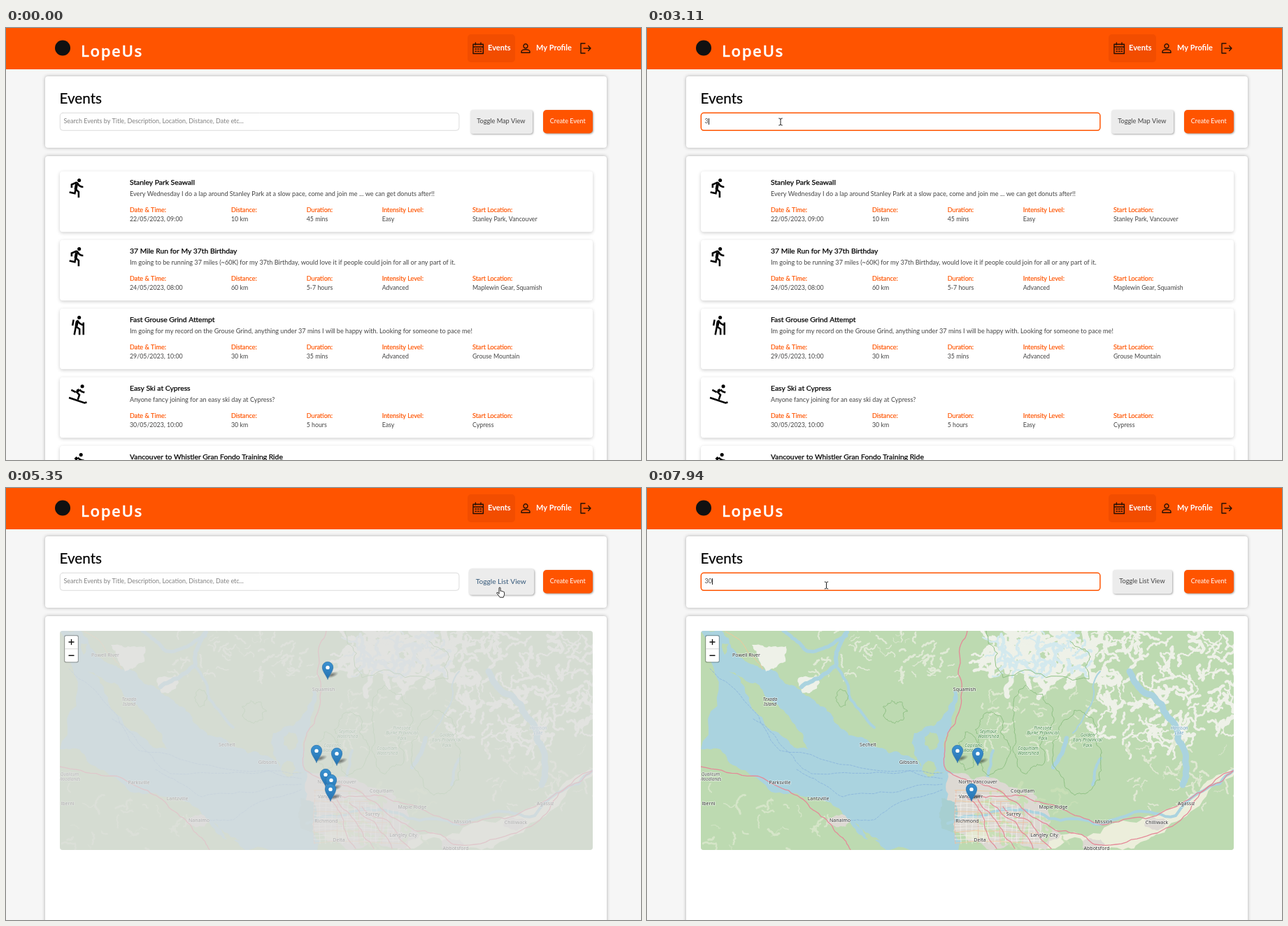
Write an HTML page with a canvas that moves like this. It is 908x617 px and loops after 8 s.

```html
<!DOCTYPE html>
<html lang="en">
<head>
<meta charset="utf-8">
<title>Events</title>
<style>
html, body { margin: 0; width: 100%; height: 100%; overflow: hidden; background: #f6f6f6; }
canvas { display: block; width: 908px; height: 617px; }
</style>
</head>
<body>
<canvas id="stage"></canvas>
<script>
const W = 908, H = 617, LOOP = 8000, ORANGE = '#ff5400';
const dpr = window.devicePixelRatio || 1;
const LATO = 'Lato, sans-serif', NOTO = '"Noto Sans", sans-serif';
let g = setup(document.getElementById('stage'));

function setup(canvas) {
  canvas.width = W * dpr;
  canvas.height = H * dpr;
  const c = canvas.getContext('2d');
  c.scale(dpr, dpr);
  c.lineJoin = c.lineCap = 'round';
  return c;
}

// Drawing helpers
function text(s, x, y, size, color, o = {}) {
  g.font = `${o.style || ''} ${o.weight || 400} ${size}px ${o.font || LATO}`;
  g.textAlign = o.align || 'left';
  g.letterSpacing = (o.spacing || 0) + 'px';
  if (o.halo) {
    g.strokeStyle = o.halo;
    g.lineWidth = 1.6;
    g.strokeText(s, x, y);
  }
  g.fillStyle = color;
  g.fillText(s, x, y);
  if (o.thick) {
    g.strokeStyle = color;
    g.lineWidth = o.thick;
    g.strokeText(s, x, y);
  }
}

function box(x, y, w, h, r, fill, shadow) {
  g.save();
  if (shadow) {
    g.shadowColor = `rgba(0,0,0,${shadow.alpha})`;
    g.shadowBlur = shadow.blur * dpr;
    g.shadowOffsetX = (shadow.x || 0) * dpr;
    g.shadowOffsetY = (shadow.y || 0) * dpr;
  }
  g.beginPath();
  g.roundRect(x, y, w, h, r);
  g.fillStyle = fill;
  g.fill();
  g.restore();
}

function outline(x, y, w, h, r, color, width) {
  g.beginPath();
  g.roundRect(x, y, w, h, r);
  g.strokeStyle = color;
  g.lineWidth = width;
  g.stroke();
}

function shape(d, x, y, { fill, stroke, width = 1 }) {
  g.save();
  g.translate(x, y);
  const p = new Path2D(d);
  if (fill) { g.fillStyle = fill; g.fill(p); }
  if (stroke) { g.strokeStyle = stroke; g.lineWidth = width; g.stroke(p); }
  g.restore();
}

function disc(x, y, r, color) {
  g.beginPath();
  g.arc(x, y, r, 0, 2 * Math.PI);
  g.fillStyle = color;
  g.fill();
}

const PANEL = { alpha: .3, blur: 5 };
const CARD = { alpha: .2, blur: 5, y: 1.5 };
const BUTTON = { alpha: .35, blur: 2.5, x: 1, y: 1 };
const clamp = v => Math.max(0, Math.min(1, v));
const ease = v => v * v * (3 - 2 * v);

// Activity figures on a 24 unit grid
const RUN = { head: [13.5, 3.5], torso: 'M10.7 7.4L9.4 14',
  limbs: 'M5 12V8.3L10.2 6.1Q11.4 6 12.3 7.8 14 11 18 11M9.6 13.8L12.9 16.6V23M9.4 14L8.6 18.3 2.5 17' };
const HIKE = { head: [13.5, 3.5], torso: 'M11.4 7.4L10.3 13',
  limbs: 'M11 7L8 23M10 13.5L13.9 16.6V23M11.3 6.6Q14 11.5 18.5 12M18.3 9V23M7.2 6L6 12.6' };
const SKI = { head: [17, 3.7], torso: 'M13.6 7.6L11 9.4',
  limbs: 'M4.6 7.8L9.5 10.3M14 7.4L16 9.6 19.5 10.6M10 9.4L13.8 13.4 12 18.6M2 16.5L19.5 22.4 22 21.6' };
const BIKE = { head: [15.5, 3.5], torso: 'M11.4 6.6L9 9',
  limbs: 'M12 6.6Q14.5 10 19 10M8.6 9.8L12 13.4V19M9.2 17a4.2 4.2 0 1 1 0-.1M23.2 17a4.2 4.2 0 1 1 0-.1' };

function figure({ head, torso, limbs }, x, y) {
  g.save();
  g.translate(x, y);
  g.scale(1.27, 1.27);
  g.lineCap = 'butt';
  g.lineJoin = 'miter';
  disc(...head, 2, '#000');
  shape(limbs, 0, 0, { stroke: '#000', width: 2 });
  shape(torso, 0, 0, { stroke: '#000', width: 3.2 });
  g.restore();
}

// Content
const COLUMNS = {
  'Date & Time:': 177, 'Distance:': 322, 'Duration:': 429.7, 'Intensity Level:': 537.7, 'Start Location:': 667,
};
const EVENTS = [
  { icon: RUN, pin: [457, 426], title: 'Stanley Park Seawall',
    about: 'Every Wednesday I do a lap around Stanley Park at a slow pace, come and join me ... we can get donuts after!!',
    facts: ['22/05/2023, 09:00', '10 km', '45 mins', 'Easy', 'Stanley Park, Vancouver'] },
  { icon: RUN, pin: [460, 273], title: '37 Mile Run for My 37th Birthday',
    about: 'Im going to be running 37 miles (~60K) for my 37th Birthday, would love it if people could join for all or any part of it.',
    facts: ['24/05/2023, 08:00', '60 km', '5-7 hours', 'Advanced', 'Maplewin Gear, Squamish'] },
  { icon: HIKE, pin: [473, 396], title: 'Fast Grouse Grind Attempt',
    about: 'Im going for my record on the Grouse Grind, anything under 37 mins I will be happy with. Looking for someone to pace me!',
    facts: ['29/05/2023, 10:00', '30 km', '35 mins', 'Advanced', 'Grouse Mountain'] },
  { icon: SKI, pin: [444, 392], title: 'Easy Ski at Cypress',
    about: 'Anyone fancy joining for an easy ski day at Cypress?',
    facts: ['30/05/2023, 10:00', '30 km', '5 hours', 'Easy', 'Cypress'] },
  { icon: BIKE, pin: [465, 434], title: 'Vancouver to Whistler Gran Fondo Training Ride',
    about: 'Looking for a small group to share a long training day on the road.',
    facts: ['02/06/2023, 07:00', '120 km', '6 hours', 'Advanced', 'Vancouver'] },
  { icon: RUN, pin: [464, 447], title: 'Saturday Evening City Run',
    about: 'A relaxed run through the city, everyone is welcome.',
    facts: ['03/06/2023, 18:30', '8 km', '1 hour', 'Easy', 'Vancouver'] },
];
for (const e of EVENTS) e.key = [e.title, e.about, ...e.facts].join('\n').toLowerCase();

// Timeline
const FOCUS = 450, SWITCH = 5300, BLUR = 5270, REFOCUS = 5700, BLINK = 250;
const keys = [{ time: FOCUS, query: '' }];

function press(word, from, to, erase) {
  const n = word.length;
  for (let i = 0; i < n; i++) {
    keys.push({ time: from + (to - from) * i / (n - 1), query: word.slice(0, erase ? n - 1 - i : i + 1) });
  }
}

press('24/05', 630, 1320);
press('24/05', 2400, 2720, true);
press('30', 3110, 3240);
press('30', 4560, 4780, true);
keys.push({ time: REFOCUS + 30, query: '' });
press('run', 6320, 6490);
press('run', 7070, 7250, true);
press('30', 7810, 7940);

const MOVES = [
  { from: 60, to: 400, x: 191, y: 134 },
  { from: 4800, to: 5020, x: 759, y: 161 },
  { from: 5020, to: 5270, x: 706, y: 143 },
  { from: 5360, to: REFOCUS, x: 256.5, y: 139 },
];

// Map
let seed = 7;
function random(low = 0, high = 1) {
  seed = (seed * 16807) % 2147483647;
  return low + (high - low) * seed / 2147483647;
}

// Midpoint displacement turns a few key points into a coast or road.
function rough(list, amp) {
  let pts = [];
  for (let i = 0; i < list.length; i += 2) pts.push([list[i], list[i + 1]]);
  for (let pass = 0; pass < 4; pass++) {
    pts = pts.flatMap((b, i) => {
      if (!i) return [b];
      const a = pts[i - 1], k = random(-amp, amp);
      return [[(a[0] + b[0]) / 2 + (b[1] - a[1]) * k, (a[1] + b[1]) / 2 - (b[0] - a[0]) * k], b];
    });
  }
  g.beginPath();
  pts.forEach(p => g.lineTo(...p));
}

function area(color, ...list) {
  rough([...list, list[0], list[1]], .16);
  g.fillStyle = color;
  g.fill();
}

function line(color, width, list, amp = .1, dash = []) {
  rough(list, amp);
  g.strokeStyle = color;
  g.lineWidth = width;
  g.setLineDash(dash);
  g.stroke();
  g.setLineDash([]);
}

function ring(x, y, rx, ry) {
  const pts = [];
  for (let i = 0; i <= 7; i++) {
    const a = i / 7 * 2 * Math.PI;
    pts.push(x + rx * Math.cos(a), y + ry * Math.sin(a));
  }
  return pts;
}

// Ridges and ice: short random walks of varying width
function ridges(count, x, y, w, h, width, color) {
  for (let i = 0; i < count; i++) {
    let px = x + random(0, w), py = y + random(0, h), angle = random(0, 6.3);
    const walk = [px, py];
    for (let step = random(1, 4); step > 0; step--) {
      angle += random(-1, 1);
      px += width * 1.6 * Math.cos(angle);
      py += width * 1.6 * Math.sin(angle);
      walk.push(px, py);
    }
    line(color, width * random(.25, 1), walk, .3);
  }
}

const TOWNS = {
  'Powell River': [142, 238], 'Sechelt': [316, 366], 'Gibsons': [374, 391], 'Squamish': [454, 287],
  'Parksville': [190, 420], 'Lantzville': [245, 443], 'Nanaimo': [276, 474], 'lberni': [88, 450],
  'North Vancouver': [473, 419], 'Vancouver': [463, 440], 'Richmond': [458, 475], 'Delta': [476, 502],
  'Surrey': [524, 465], 'Coquitlam': [537, 432], 'Maple Ridge': [581, 455], 'Langley City': [568, 495],
  'Abbotsford': [643, 514], 'Mission': [653, 476], 'Chilliwack': [729, 477], 'Agassiz': [771, 450],
};
const PARKS = {
  'Seymour|Watershed': [488, 347], 'Capilano|Watershed': [467, 367], 'Coquitlam|Watershed': [545, 371],
  'Pinecone|Burke Provincial|Park': [566, 342], 'Golden|Ears Provincial|Park': [630, 352],
};

function label(name, [x, y], size, color, style) {
  name.split('|').forEach((s, i) => text(s, x, y + 2.5 + i * 7.6, size, color,
    { font: NOTO, align: 'center', style, halo: 'rgba(255,255,255,.6)' }));
}

function paintMap() {
  const water = '#aad3df', land = '#bddab1', town = '#ddd9d3', snow = '#eef1e8', road = '#e48a98';
  g.fillStyle = land;
  g.fillRect(77, 204, 762, 313);
  ridges(60, 240, 204, 200, 70, 3, '#e0ead6');
  ridges(60, 480, 280, 150, 100, 2.5, '#dce8cf');
  ridges(170, 640, 204, 199, 165, 5, snow);
  ridges(45, 690, 365, 149, 90, 3, '#dfe8d2');
  ridges(75, 488, 206, 142, 62, 9, snow);
  ridges(45, 492, 208, 134, 58, 5, '#d3e9ee');
  ridges(30, 80, 430, 190, 85, 3, '#d5e5c8');

  // Strait, its islands and the inlets
  area(water, 77, 204, 107, 204, 140, 247, 188, 267, 222, 293, 263, 322, 302, 356, 346, 379, 396, 402, 428, 403,
    463, 417, 438, 434, 422, 480, 450, 504, 445, 517, 347, 517, 290, 476, 226, 441, 140, 403, 77, 373);
  area(land, 117, 262, 165, 288, 222, 350, 231, 373, 205, 366, 150, 315);
  area(land, 108, 222, 117, 222, 111, 238);
  area(land, 296, 476, 334, 503, 316, 503);
  area(snow, 150, 224, 199, 226, 198, 248, 170, 262);
  area(snow, 217, 271, 247, 267, 242, 287, 222, 293);
  area(water, 382, 350, 430, 318, 438, 290, 443, 290, 431, 350, 428, 404, 394, 404);
  area(land, ...ring(407, 361, 11, 13));
  area(land, ...ring(404, 401, 10, 12));
  line(water, 5, [195, 204, 229, 233, 285, 211]);
  line(water, 6, [286, 206, 270, 254, 221, 284]);
  line(water, 4, [270, 254, 325, 342]);
  line(water, 9, [690, 262, 736, 309, 768, 374, 766, 424]);
  line(water, 6, [600, 357, 581, 399]);
  line(water, 4, [649, 386, 637, 424]);
  line(water, 4, [495, 375, 488, 419, 461, 419]);
  line(water, 2, [648, 262, 609, 350]);

  // Fraser valley and the city
  area('#eceedb', 560, 474, 700, 478, 790, 433, 838, 402, 838, 412, 740, 492, 680, 517, 560, 517);
  area(town, 430, 407, 505, 420, 557, 440, 575, 480, 570, 517, 490, 517, 434, 487);
  area('#a7cfd1', 421, 443, 440, 449, 438, 492, 421, 486);
  area('#e4e8d1', ...ring(475, 496, 20, 9));
  for (const [x, y] of [[575, 495], [727, 479], [638, 509], [274, 476]]) area(town, ...ring(x, y, 17, 9));
  ridges(30, 480, 430, 130, 80, 5, '#c8dfb7');
  line(water, 4, [838, 404, 756, 468, 640, 480, 510, 459, 430, 479]);
  for (let i = 0; i < 16; i++) {
    line(i % 4 ? '#f3f1ee' : '#edb6a6', .8, [442 + i * 8, 432 + i * 2, 441 + i * 8, 508], .03);
    line(i % 3 ? '#f3f1ee' : '#f0c799', .8, [440, 432 + i * 5, 510 + i * 4, 433 + i * 5], .03);
  }
  for (let i = 0; i < 4; i++) line(road, 1.2, [455 + i * 18, 440 + i * 5, 500 + i * 26, 515]);
  line(road, 1.3, [458, 204, 450, 286, 430, 350, 428, 403, 514, 441, 584, 489, 640, 509, 757, 479, 838, 404]);
  line(road, 1.3, [464, 441, 547, 444, 651, 481, 770, 447, 838, 404]);
  line(road, 1.3, [77, 398, 193, 429, 257, 474, 291, 517]);
  line('#f1c79b', 1, [112, 205, 165, 259]);

  const edge = '#8fc184';
  line(edge, 1, ring(492, 365, 25, 46), .2);
  line(edge, 1, ring(548, 345, 28, 65), .2);
  line(edge, 1, ring(618, 378, 32, 62), .2);
  line(edge, 1, ring(458, 376, 14, 28), .2);
  line(edge, 1, [485, 204, 509, 271, 632, 273, 632, 236, 605, 219], .2);
  line(edge, 1, ring(279, 300, 8, 13), .2);
  line(edge, 1, ring(354, 319, 18, 16), .3);
  for (let i = 0; i < 4; i++) {
    line('#88b3dc', .8, [90 + i * 62, 258 + i * 72, 190 + i * 45, 375 + i * 33, 422, 407 + i * 8], .08, [3, 2]);
  }

  for (const name in TOWNS) label(name, TOWNS[name], 7, '#333');
  for (const name in PARKS) label(name, PARKS[name], 6.4, '#3f8744', 'italic');
  label('Texada|Island', [176, 301], 6.5, '#333', 'italic');
  label('Qualicum|Woodlands', [91, 408], 6.2, '#555', 'italic');
  label('Harrison|Lake', [761, 342], 6.5, '#6b9fc0', 'italic');
}

const tiles = document.createElement('canvas');
const screen = g;
g = setup(tiles);
paintMap();
g = screen;

function pin([x, y]) {
  g.save();
  g.translate(x, y);
  g.save();
  g.transform(1, 0, -.6, .6, 0, 0);
  const shade = g.createRadialGradient(0, -10, 1, 0, -10, 8);
  shade.addColorStop(0, 'rgba(0,0,0,.42)');
  shade.addColorStop(1, 'rgba(0,0,0,0)');
  g.fillStyle = shade;
  g.fillRect(-8, -18, 16, 18);
  g.restore();
  const blue = g.createLinearGradient(0, -25, 0, 0);
  blue.addColorStop(0, '#3c93d2');
  blue.addColorStop(1, '#2672b0');
  shape('M0 0C-1.5-4.5-7.7-11-7.7-17a7.7 7.7 0 0 1 15.4 0C7.7-11 1.5-4.5 0 0z', 0, 0,
    { fill: blue, stroke: '#2b71a8', width: .7 });
  disc(0, -16.6, 2.7, '#fff');
  g.restore();
}

// Page parts
function header() {
  g.fillStyle = ORANGE;
  g.fillRect(0, 0, W, 59);
  disc(81, 28.5, 11, '#111');
  text('LopeUs', 107, 41, 22.3, '#fff', { font: '"Open Sans", sans-serif', weight: 600, spacing: 1.5, thick: .3 });
  box(660, 9, 68, 40, 5, '#f24d00');
  const ink = { stroke: '#241006', width: 1.4 };
  shape('M668 23.2h14.4v13.3h-14.4zM668 27h14.4M671.4 21v3M679 21v3', 0, 0, ink);
  for (const y of [30, 33.3]) shape('M671 0h1.5m2 0h1.5m2 0h1.5', 0, y, ink);
  shape('M743 22.8a3 3 0 1 1-.01 0zM737 35.3v-1.6c0-2 3.5-3 6-3s6 1 6 3v1.6z', 0, 0, ink);
  shape('M828 22h-6v14h6M826 29h10M832.6 25.6l3.4 3.4-3.4 3.4', 0, 0, ink);
  text('Events', 689, 32.4, 11, '#fff', { weight: 700 });
  text('My Profile', 758, 32.4, 11, '#fff', { weight: 700 });
}

function searchPanel(t, { time, query }, mapView) {
  box(56, 69, 803, 102, 4, '#fff', PANEL);
  text('Events', 76.5, 108, 20.7, '#000', { thick: .2 });
  const focused = (t >= FOCUS && t < BLUR) || t >= REFOCUS;
  outline(77.3, 121.3, 570.6, 25, 4, focused ? ORANGE : '#dcdcdc', focused ? 1.5 : 1);
  if (query) text(query, 82.5, 136.3, 8.9, '#444');
  else text('Search Events by Title, Description, Location, Distance, Date etc...', 82.5, 136.3, 8.97, '#808080');
  if (focused && Math.floor((t - time) / BLINK) % 2 === 0) {
    g.font = `8.9px ${LATO}`;
    g.fillStyle = '#222';
    g.fillRect(Math.round(82.6 + g.measureText(query).width), 129, 1, 9);
  }

  const hover = clamp((t - 5120) / 100) * (1 - clamp((t - 5450) / 100));
  const width = mapView ? 85 : 89;
  g.save();
  g.translate(708.5, 134);
  g.scale(1 + .1 * hover, 1 + .1 * hover);
  box(-width / 2, -17, width, 34, 4, '#ececec', BUTTON);
  text(mapView ? 'Toggle List View' : 'Toggle Map View', -.6, 2.4, 9.2, hover > .5 ? '#35597a' : '#444', { align: 'center' });
  g.restore();
  box(768, 117, 71, 33.5, 5, ORANGE, BUTTON);
  text('Create Event', 803.3, 136.4, 9, '#fff', { align: 'center' });
}

function card(e, y) {
  box(77, y, 762, 86.5, 4, '#fff', CARD);
  figure(e.icon, 87.5, y + 8.3);
  text(e.title, 177, y + 18.8, 10.35, '#000', { thick: .25 });
  text(e.about, 177, y + 35.2, 9.12, '#444');
  Object.entries(COLUMNS).forEach(([name, x], i) => {
    text(name, x, y + 58.3, 9, ORANGE, { thick: .2 });
    text(e.facts[i], x, y + 71.3, 8.8, '#444');
  });
}

function mapPanel(t, shown) {
  g.save();
  g.beginPath();
  g.roundRect(77, 204, 762, 313, 4);
  g.clip();
  g.fillStyle = '#ddd';
  g.fillRect(77, 204, 762, 313);
  g.globalAlpha = clamp((t - SWITCH - 30) / 80);
  g.drawImage(tiles, 0, 0, W, H);
  g.restore();
  shown.map(e => e.pin).sort((a, b) => a[1] - b[1]).forEach(pin);
  box(83, 210, 21, 39.5, 3, 'rgba(0,0,0,.28)');
  box(84.2, 211.2, 18.6, 37.1, 2, '#fff');
  g.fillStyle = '#ccc';
  g.fillRect(84.2, 229.4, 18.6, .8);
  shape('M90 220h7M93.5 216.5v7M90 239.3h7', 0, 0, { stroke: '#111', width: 1.4 });
}

function pointer(t) {
  if (t < MOVES[0].from) return;
  let x = 820, y = 604;
  for (const m of MOVES) {
    const k = ease(clamp((t - m.from) / (m.to - m.from)));
    x += (m.x - x) * k;
    y += (m.y - y) * k;
  }
  const inside = (left, top, right, bottom) => x > left && x < right && y > top && y < bottom;
  if (inside(77, 121, 648, 147)) {
    shape('M-2.3-5Q0-5 0-3.6Q0-5 2.3-5M0-3.6V3.6M-2.3 5Q0 5 0 3.6Q0 5 2.3 5', x, y, { stroke: '#222' });
  } else if (inside(662, 115, 756, 154)) {
    shape('M-1 7.8V0a1 1 0 0 1 2 0v4.2q1.8-.9 2.1.5 1.7-.7 2 .6 1.6-.3 1.5 1.2V9.4Q6 11 5.2 13.2H.3Q-2 10-4.2 7.3q-.4-1.7 1.3-1z',
      x, y, { fill: '#fff', stroke: '#111', width: .9 });
  } else {
    shape('M0 0V10.2L2.3 8.1 4 11.8 5.6 11.1 4 7.5H7.2z', x, y, { fill: '#fff', stroke: '#222', width: .9 });
  }
}

function draw(t) {
  const key = keys.findLast(k => k.time <= t) || { time: 0, query: '' };
  const shown = EVENTS.filter(e => e.key.includes(key.query));
  const mapView = t >= SWITCH;
  g.fillStyle = '#f6f6f6';
  g.fillRect(0, 0, W, H);
  header();
  searchPanel(t, key, mapView);
  box(56, 183, 803, 460, 4, '#fff', PANEL);
  if (mapView) mapPanel(t, shown);
  else shown.forEach((e, i) => card(e, 204.7 + i * 98));
  pointer(t);
}

const start = performance.now();
function tick() {
  draw((performance.now() - start) % LOOP);
  requestAnimationFrame(tick);
}
draw(0);
requestAnimationFrame(tick);
</script>
</body>
</html>
```
